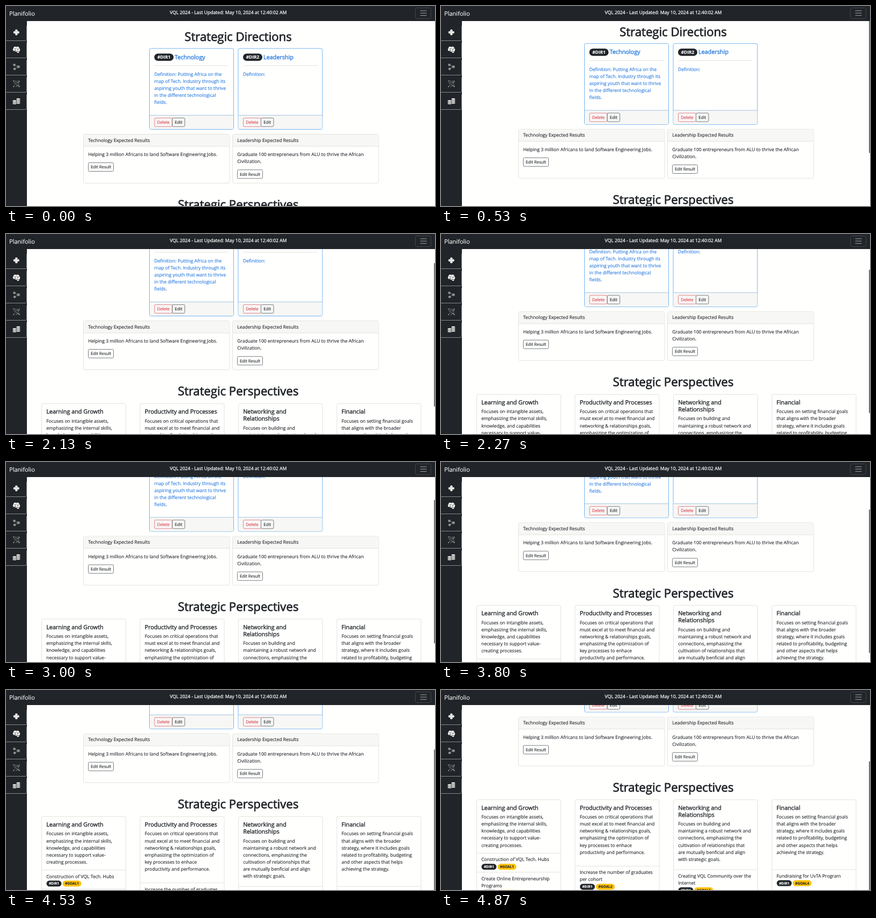
Recreate the animation shown at these times as an HTML page. Size 800 by 372 pixels, loop 5340 ms.

```html
<!DOCTYPE html>
<html lang="en">
<head>
<meta charset="utf-8">
<title>Strategy board</title>
<style>
html, body { margin: 0; height: 100%; overflow: hidden; background: #fffffe; }
svg { display: block; width: 800px; height: 372px; text-rendering: geometricPrecision; }
text { font: 8.6px "Open Sans", "Noto Sans", sans-serif; fill: #212529; stroke: #212529; stroke-width: .12; }
.h1 { font-size: 22.2px; text-anchor: middle; stroke-width: .75; }
.h2 { font-size: 10.85px; stroke-width: .36; }
.blue { fill: #2478de; stroke: #2478de; }
.btn { font-size: 7.75px; text-anchor: middle; }
.red { fill: #dc3545; stroke: #dc3545; }
.pill { font-size: 6.5px; font-weight: 700; text-anchor: middle; }
.big { font-size: 8.4px; }
.light { fill: #fff; stroke: #fff; }
.brand { font-size: 11.06px; }
.stamp { stroke-width: .25; text-anchor: middle; }
</style>
</head>
<body>
<svg id="stage" viewBox="0 0 800 372"></svg>
<script>
const DARK = '#212529', LINE = '#e2e2dc', BLUE = '#74b4ee', TINT = '#f7f7f5', PAPER = '#fffffe';
const WHITE = '#f4f4f0', DIM = '#90938f';

const text = (x, y, lines, cls = '') => lines.split('|').map((line, i) =>
  `<text x="${x}" y="${y + i * 13.1}" class="${cls}">${line}</text>`).join('');
const rect = (x, y, w, h, fill, stroke = 'none', r = 0) =>
  `<rect x="${x}" y="${y}" width="${w}" height="${h}" rx="${r}" fill="${fill}" stroke="${stroke}"/>`;
const path = (d, stroke, width = 1) => `<path d="${d}" fill="none" stroke="${stroke}" stroke-width="${width}"/>`;
const rule = (x, y, w, color = LINE) => path(`M${x} ${y}h${w}`, color);
const dots = (fill, ...list) => list.map(([x, y, r]) =>
  `<circle cx="${x}" cy="${y}" r="${r}" fill="${fill}"/>`).join('');

const button = (x, y, w, label, cls = '', color = '#777c80') =>
  rect(x, y, w, 16, 'none', color, 2) + text(x + w / 2, y + 10.8, label, 'btn ' + cls);
const pill = (x, y, w, h, label, fill, cls = '') =>
  rect(x, y, w, h, fill, 'none', h / 2) + text(x + w / 2, y + h * .72, label, 'pill ' + cls);

function direction(x, n, title, definition) {
  return rect(x, 79, 157, 150.5, PAPER, BLUE, 3) +
    rect(x + .5, 203, 156, 26, TINT, 'none', 2.5) + rule(x, 203.3, 157, '#a4c4e0') +
    pill(x + 9, 88.5, 36, 13.5, '#DIR' + n, DARK, 'big light') +
    text(x + 47, 98.6, title, 'h2 blue') + rule(x + 9, 110.8, 139) +
    text(x + 9, 130, definition, 'blue') +
    button(x + 9.5, 208.3, 33, 'Delete', 'red', '#e4808a') + button(x + 42.5, 208.3, 23.5, 'Edit');
}

function results(x, title, body, buttonY) {
  return rect(x, 238.5, 272.5, 91, PAPER, LINE, 3) + rect(x + .5, 239, 271.5, 22, TINT, 'none', 2.5) +
    rule(x, 261, 272.5) + text(x + 8.7, 252.6, title) + text(x + 8.7, 279, body) +
    button(x + 9, buttonY, 47, 'Edit Result');
}

function perspective(x, title, body, listY, items) {
  const extra = title.includes('|') ? 13.1 : 0;
  let out = rect(x, 392.5, 157, 300, PAPER, LINE, 3) +
    text(x + 8.7, 411, title, 'h2') + text(x + 8.7, 427.6 + extra, body);
  for (const [label, dir, goal] of items) {
    const rows = label.split('|').length * 13.1;
    out += rule(x, listY, 157) + text(x + 8.7, listY + 14.8, label) +
      pill(x + 9, listY + 6.6 + rows, 28, 11, '#DIR' + dir, DARK, 'light') +
      pill(x + 39, listY + 6.6 + rows, 35, 11, '#GOAL' + goal, '#ffc107');
    listY += 22.2 + rows;
  }
  return out;
}

const page = text(433, 65.2, 'Strategic Directions', 'h1') +
  direction(267.5, 1, 'Technology', 'Definition: Putting Africa on the|map of Tech. Industry through its|aspiring youth that want to thrive|in the different technological|fields.') +
  direction(433, 2, 'Leadership', 'Definition:') +
  results(144.5, 'Technology Expected Results', 'Helping 3 million Africans to land Software Engineering Jobs.', 291.5) +
  results(422.5, 'Leadership Expected Results', 'Graduate 100 entrepreneurs from ALU to thrive the African|Civilization.', 304.7) +
  text(433, 377.3, 'Strategic Perspectives', 'h1') +
  perspective(66.5, 'Learning and Growth', 'Focuses on intangible assets,|emphasizing the internal skills,|knowledge, and capabilities|necessary to support value-|creating processes.', 492,
    [['Construction of VQL Tech. Hubs', 1, 1], ['Create Online Entrepreneurship|Programs', 1, 1]]) +
  perspective(250, 'Productivity and Processes', 'Focuses on critical operations that|must excel at to meet financial and|networking &amp; relationships goals,|emphasizing the optimization of|key processes to enhace|productivity and performance.', 516,
    [['Increase the number of graduates|per cohort', 1, 2]]) +
  perspective(433.5, 'Networking and|Relationships', 'Focuses on building and|maintaining a robust network and|connections, emphasizing the|cultivation of relationships that|are mutually benficial and align|with strategic goals.', 522.5,
    [['Creating VQL Community over the|Internet', 1, 5]]) +
  perspective(617, 'Financial', 'Focuses on setting financial goals|that aligns with the broader|strategy, where it includes goals|related to profitability, budgeting|and other aspects that helps|achieving the strategy.', 522.5,
    [['Fundraising for UvTA Program', 1, 4]]);

const coin = (x, y) => `<ellipse cx="${x}" cy="${y}" rx="3.8" ry="1.7" fill="${WHITE}" stroke="${DARK}" stroke-width=".7"/>`;
const icons =
  dots(WHITE, [19.3, 45.8, 2.3], [16, 49, 2.3], [22.6, 49, 2.3], [19.3, 52.2, 2.3], [19.3, 49, 1.6]) +
  dots(WHITE, [17, 78.6, 3], [21.6, 78.6, 3], [15.6, 81, 2.8], [23.4, 81.4, 2.8], [19.5, 82, 3], [22.4, 85, 2.2]) +
  path('M15 80h3l1.5-2M24.5 80h-3v2.5M16 82.5h3M20 84.5h4', DARK, .7) +
  path('M15.5 109.5L23 113L16 117', DIM, .9) + dots(DIM, [15.5, 109.5, 2.3], [23.3, 113, 2.5], [16, 117, 2.3]) +
  path('M13.5 139.5h4l2 3h5M14 143h3l3 4h5M14 150l3-4M20 139l3 2M18 150.5l3-2h3M22 145l3-3', DIM, .9) +
  dots(DIM, [14, 139.5, 1.1], [24.5, 140, 1.2], [14.2, 150, 1.1], [24.6, 149.8, 1.2]) +
  [181.4, 178.9, 176.4].map(y => coin(16, y)).join('') +
  [180.5, 178, 175.5, 173].map(y => coin(22.8, y)).join('');

const frame = rect(0, 28, 39, 344, DARK) + rect(0, 0, 800, 28, DARK) +
  [64.5, 96.5, 128.5, 160.5, 192.5].map(y => path(`M0 ${y}H36.5q2 0 2-2V${y - 28}`, '#a0a2a2', .8)).join('') +
  icons + text(6, 17.6, 'Planifolio', 'brand light') +
  text(414.5, 14.6, 'VQL 2024 - Last Updated: May 10, 2024 at 12:40:02 AM', 'stamp light') +
  rect(763.5, 3.5, 29, 20, 'none', '#42464a', 3) +
  [8.8, 13.2, 17.6].map(y => rule(772.5, y, 12, '#a4a6a8')).join('');

const stage = document.getElementById('stage');
stage.innerHTML = `<g id="page">${page}</g><g id="bar">${rect(798, 0, 2, 267, '#707274', 'none', 1)}</g>${frame}`;
const pageGroup = document.getElementById('page'), bar = document.getElementById('bar');

// Wheel notches: [start, duration] in ms, each scrolling by NOTCH pixels.
const LOOP = 5340, TICK = 200 / 3, NOTCH = 31.4;
const notches = [[390, 400], [1262, 135], [2040, 200], [2946, 190], [3795, 200], [4525, 200]];
const ease = u => u * u * (3 - 2 * u);

function draw(now) {
  const t = Math.floor((now % LOOP + 5) / TICK) * TICK;
  const scroll = notches.reduce((sum, [start, length]) =>
    sum + NOTCH * ease(Math.min(1, Math.max(0, (t - start) / length))), 0);
  pageGroup.setAttribute('transform', `translate(0 ${-scroll})`);
  bar.setAttribute('transform', `translate(0 ${scroll * .703})`);
  bar.setAttribute('opacity', scroll > 0 ? 1 : 0);
}

const origin = performance.now();
function loop() {
  draw(performance.now() - origin);
  requestAnimationFrame(loop);
}
loop();
</script>
</body>
</html>
```
